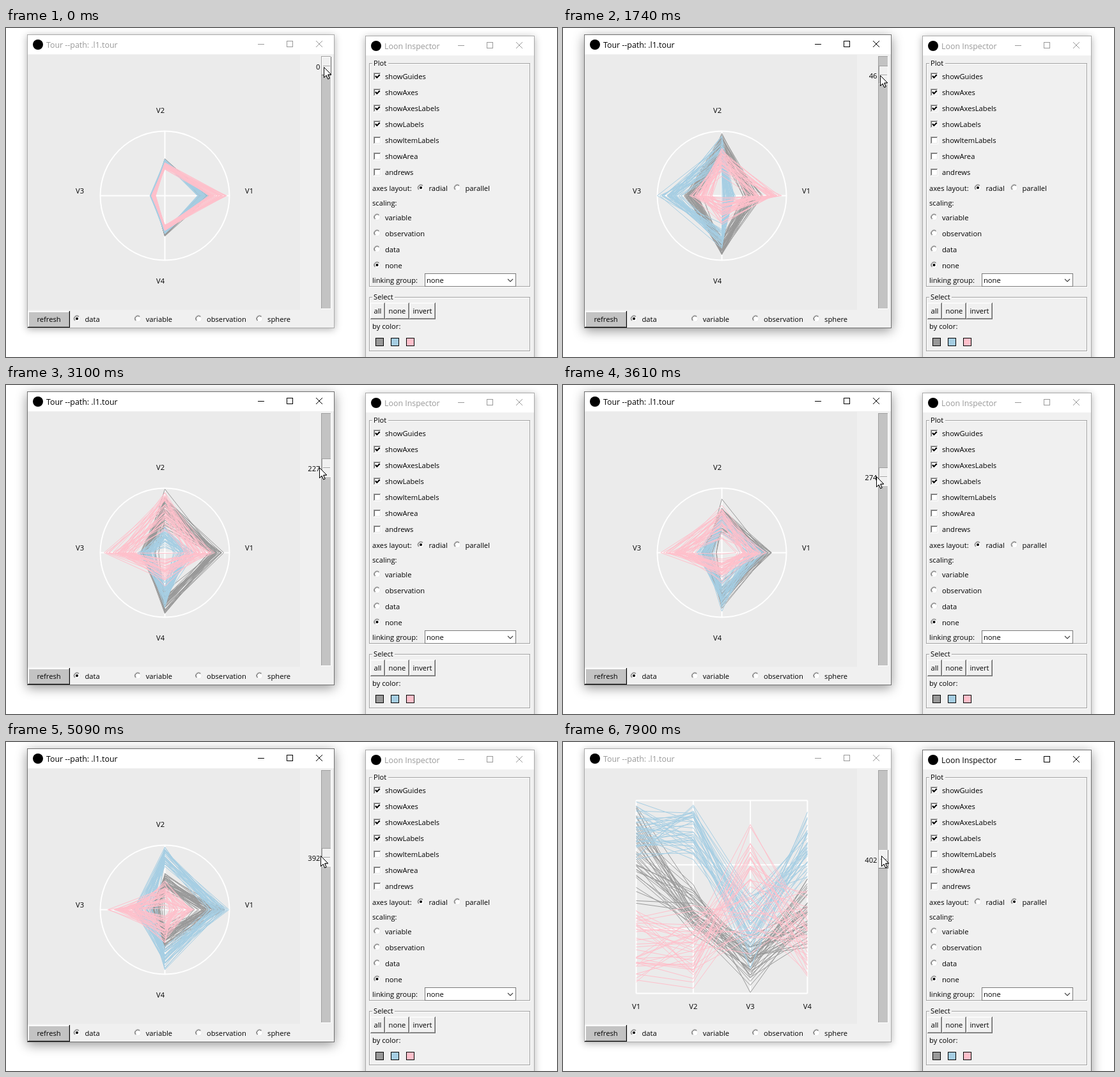
An HTML page with a canvas for the animation above (8000 ms loop, 862 by 515 pixels).

```html
<!DOCTYPE html>
<html lang="en">
<head>
<meta charset="utf-8">
<title>Tour</title>
<style>
  html, body { margin: 0; width: 100%; height: 100%; overflow: hidden; background: #fff; }
  canvas { display: block; }
</style>
</head>
<body>
<canvas id="stage" width="862" height="515"></canvas>
<script>
const ctx = document.getElementById('stage').getContext('2d');
const LOOP = 8000;
const COLORS = ['#999999', '#a6cee3', '#ffc0cb'];
const FACE = '#f0f0f0', TROUGH = '#c3c3c3';
const ITEMS = 38;

// Picture updates come in bursts: [first, last, number of steps]
const BURSTS = [
  [580, 1590, 8], [1740, 2710, 8], [2860, 3100, 3], [3250, 3890, 6],
  [4040, 4160, 2], [4310, 4940, 6], [5090, 5330, 3],
  [5810, 6320, 5], [6440, 6710, 3], [6960, 7900, 7]
];
const ACTIVATE = 580, RELEASE = 5810, SWITCH = 6960, PARALLEL = 7110;

// Tour position over time
const COUNT = [
  [580, 0], [1160, 14], [1740, 46], [2710, 160], [3100, 227],
  [3890, 318], [4160, 330], [4940, 373], [5090, 392], [5330, 402]
];
const DRAG_X = [[580, 497], [1740, 496], [3100, 490], [4160, 490], [5330, 492]];
const MOVE = [
  [5330, 492, 181], [5810, 500, 212], [5940, 538, 292], [6070, 600, 342],
  [6200, 676, 308], [6320, 718, 263], [6440, 714, 257], [6710, 707, 249],
  [7110, 707, 249], [7273, 694, 248], [7430, 640, 236], [7587, 570, 208],
  [7743, 515, 187], [7900, 498, 178]
];

// Spread of each group (grey, blue, pink): tour position, then low/high for V1..V4
const SPREAD = [
  [0,   [.53, .72, .49, .58, .15, .20, .54, .64],
        [.50, .69, .47, .57, .17, .23, .51, .60],
        [.62, 1.0, .40, .52, .13, .21, .45, .55]],
  [46,  [.32, .68, .48, 1.0, .28, .62, .58, 1.0],
        [.00, .22, .38, .95, .58, 1.0, .38, .88],
        [.32, 1.0, .28, .78, .08, .52, .00, .45]],
  [227, [.58, 1.0, .38, 1.0, .08, .46, .58, 1.0],
        [.12, .48, .08, .52, .12, .46, .38, .95],
        [.15, .92, .32, 1.0, .36, 1.0, .00, .52]],
  [330, [.28, .68, .22, .63, .05, .32, .28, .78],
        [.46, 1.0, .56, 1.0, .10, .42, .36, 1.0],
        [.08, .64, .08, .52, .36, 1.0, .04, .42]],
  [402, [.42, 1.0, .28, .60, .00, .36, .18, .66],
        [.66, 1.0, .68, 1.0, .12, .60, .56, 1.0],
        [.00, .52, .00, .50, .20, 1.0, .03, .56]]
];

const lerp = (a, b, k) => a + (b - a) * k;
const clamp = (v, lo, hi) => Math.min(hi, Math.max(lo, v));

// Finds the pair of keys around t and how far t lies between them
function locate(keys, t) {
  let i = 0;
  while (i < keys.length - 2 && t >= keys[i + 1][0]) i++;
  const a = keys[i], b = keys[i + 1];
  return { a, b, k: clamp((t - a[0]) / (b[0] - a[0]), 0, 1) };
}
function sample(keys, t, col = 1) {
  const { a, b, k } = locate(keys, t);
  return lerp(a[col], b[col], k);
}
function snap(t) {
  let last = 0;
  for (const [from, to, steps] of BURSTS) {
    const gap = (to - from) / (steps - 1);
    if (t >= from - .01) last = from + gap * Math.min(steps - 1, Math.floor((t - from + .01) / gap));
  }
  return last;
}

let seed = 20417;
function rand() {
  seed = (seed * 1664525 + 1013904223) % 4294967296;
  return seed / 4294967296;
}
const bell = () => (rand() + rand() - 1) * 1.05;
const traits = COLORS.map(() => Array.from({ length: ITEMS }, () =>
  Array.from({ length: 4 }, () => [bell(), bell()])));

function valuesAt(n) {
  const { a, b, k } = locate(SPREAD, n);
  const turn = n / 130, c = Math.cos(turn), s = Math.sin(turn);
  return traits.map((group, g) => group.map(item => item.map(([p, q], axis) => {
    const lo = lerp(a[g + 1][axis * 2], b[g + 1][axis * 2], k);
    const hi = lerp(a[g + 1][axis * 2 + 1], b[g + 1][axis * 2 + 1], k);
    return lerp(lo, hi, (clamp(p * c + q * s, -1, 1) + 1) / 2);
  })));
}

function rect(x, y, w, h, color) {
  ctx.fillStyle = color;
  ctx.fillRect(x, y, w, h);
}
function frame(x, y, w, h, color) {
  ctx.strokeStyle = color;
  ctx.lineWidth = 1;
  ctx.strokeRect(x + .5, y + .5, w - 1, h - 1);
}
function path(points, color, width = 1, closed = false) {
  ctx.beginPath();
  points.forEach(([x, y]) => ctx.lineTo(x, y));
  if (closed) ctx.closePath();
  ctx.strokeStyle = color;
  ctx.lineWidth = width;
  ctx.stroke();
}
function disc(x, y, r, color) {
  ctx.beginPath();
  ctx.arc(x, y, r, 0, Math.PI * 2);
  ctx.fillStyle = color;
  ctx.fill();
}
// Text placed by the middle of its line
function text(str, x, y, align = 'left', color = '#000', size = 11.2) {
  ctx.font = size + 'px "Open Sans", "Noto Sans", sans-serif';
  ctx.textAlign = align;
  ctx.fillStyle = color;
  ctx.fillText(str, x, y + 4);
}
function bevel(x, y, w, h, light, dark) {
  rect(x, y, w, 1, light);
  rect(x, y, 1, h, light);
  rect(x, y + h - 1, w, 1, dark);
  rect(x + w - 1, y, 1, h, dark);
}

function windowBox(x, y, w, h, title, active) {
  const ink = active ? '#000' : '#999';
  ctx.save();
  ctx.shadowColor = active ? 'rgba(0,0,0,.42)' : 'rgba(0,0,0,.3)';
  ctx.shadowBlur = active ? 17 : 11;
  ctx.shadowOffsetY = active ? 4 : 2;
  rect(x, y, w, h, FACE);
  ctx.restore();
  rect(x, y, w, 31, '#fff');
  frame(x, y, w, h, active ? '#707070' : '#aaaaaa');
  disc(x + 17, y + 16, 8, '#000');
  text(title, x + 30, y + 16.5, 'left', ink, 12.4);
  const right = x + w, mid = y + 16;
  rect(right - 120, mid - 1, 10, 1, ink);
  frame(right - 75, mid - 6, 10, 10, ink);
  path([[right - 29, mid - 6], [right - 19, mid + 4]], ink);
  path([[right - 19, mid - 6], [right - 29, mid + 4]], ink);
}

function radio(x, y, label, on) {
  disc(x, y, 5.5, '#fff');
  for (const [r, from, color] of [[5, .75, '#a0a0a0'], [4.1, .75, '#696969'], [5, -.25, '#e3e3e3']]) {
    ctx.beginPath();
    ctx.arc(x, y, r, Math.PI * from, Math.PI * (from + 1));
    ctx.strokeStyle = color;
    ctx.lineWidth = 1;
    ctx.stroke();
  }
  if (on) disc(x, y, 2.1, '#000');
  text(label, x + 12.5, y + 1);
}
function checkbox(y, label, on) {
  rect(575, y - 6, 12, 12, '#fff');
  bevel(575, y - 6, 12, 12, '#a0a0a0', '#fff');
  bevel(576, y - 5, 10, 10, '#696969', '#e3e3e3');
  if (on) path([[578, y - 1], [580.3, y + 1.7], [584.7, y - 2.8]], '#000', 2.2);
  text(label, 593, y);
}
function button(x, y, w, h, label, face = FACE) {
  rect(x, y, w, h, face);
  bevel(x, y, w, h, '#fff', '#696969');
  bevel(x + 1, y + 1, w - 2, h - 2, '#f4f4f4', '#a0a0a0');
  text(label, x + w / 2, y + h / 2, 'center');
}
function fieldset(y, h, label, labelWidth) {
  frame(569, y + 1, 252, h, '#fff');
  frame(568, y, 252, h, '#a0a0a0');
  rect(573, y - 2, labelWidth, 5, FACE);
  text(label, 575, y);
}

function radialPlot(groups) {
  const cx = 248.5, cy = 262.5, R = 101;
  path([[cx - R, cy], [cx + R, cy]], '#fff', 2);
  path([[cx, cy - R], [cx, cy + R]], '#fff', 2);
  ctx.beginPath();
  ctx.arc(cx, cy, R, 0, Math.PI * 2);
  ctx.stroke();
  groups.forEach((group, g) => group.forEach(([a, b, c, d]) => path(
    [[cx + a * R, cy], [cx, cy - b * R], [cx - c * R, cy], [cx, cy + d * R]], COLORS[g], 1, true)));
  text('V1', 380.5, 255, 'center');
  text('V2', 241.5, 129, 'center');
  text('V3', 115.5, 255, 'center');
  text('V4', 241.5, 396, 'center');
}
function parallelPlot(groups) {
  const top = 91.5, height = 302, axisX = i => 114.5 + i * 89.3;
  for (let i = 0; i < 4; i++) {
    const y = top + height * i / 3;
    path([[axisX(0), y], [axisX(3), y]], '#fff', 2);
    path([[axisX(i), top], [axisX(i), top + height]], '#fff', 2);
    text('V' + (i + 1), axisX(i), 414, 'center');
  }
  groups.forEach((group, g) => group.forEach(item => path(
    item.map((v, i) => [axisX(i), top + height * (1 - v)]), COLORS[g])));
}

function slider(n, pressed) {
  rect(493, 44, 16, 396, TROUGH);
  bevel(493, 44, 16, 396, '#a0a0a0', '#fff');
  const y = Math.round(45 + n * .308);
  const [light, dark] = pressed ? ['#a0a0a0', '#fff'] : ['#fff', '#696969'];
  rect(494, y, 15, 29, FACE);
  bevel(494, y, 15, 29, light, dark);
  rect(496, y + 14, 11, 1, '#a0a0a0');
  rect(496, y + 15, 11, 1, '#fff');
  text(String(n), 491.5, y + 16, 'right');
}

function tourWindow(t, n) {
  windowBox(33, 10, 481, 460, 'Tour --path: .l1.tour', t >= ACTIVATE && t < SWITCH);
  rect(34, 42, 426, 399, '#ebebeb');
  (t >= PARALLEL ? parallelPlot : radialPlot)(valuesAt(n));
  slider(n, t >= ACTIVATE && t < RELEASE);
  button(34, 443, 66, 26, 'refresh', TROUGH);
  rect(99, 443, 1, 26, '#000');
  rect(34, 468, 66, 1, '#000');
  ['data', 'variable', 'observation', 'sphere'].forEach((s, i) => radio(111 + i * 95.2, 455, s, i === 0));
}

function inspector(t) {
  windowBox(562, 12, 265, 540, 'Loon Inspector', t >= SWITCH);
  fieldset(55, 350, 'Plot', 25);
  ['showGuides', 'showAxes', 'showAxesLabels', 'showLabels', 'showItemLabels', 'showArea', 'andrews']
    .forEach((s, i) => checkbox(76 + i * 25, s, i < 4));
  const parallel = t >= PARALLEL;
  text('axes layout:', 573, 251);
  radio(649, 250, 'radial', !parallel);
  radio(706, 250, 'parallel', parallel);
  text('scaling:', 573, 274);
  ['variable', 'observation', 'data', 'none'].forEach((s, i) => radio(580.5, 296 + i * 25, s, i === 3));
  text('linking group:', 573, 395);
  rect(655, 384, 143, 21, '#fff');
  frame(655, 384, 143, 21, '#7a7a7a');
  text('none', 658, 395);
  path([[785, 393], [789, 397], [793, 393]], '#444', 1.2);
  fieldset(421, 85, 'Select', 35);
  button(570, 430, 23, 26, 'all');
  button(593, 430, 38, 26, 'none');
  button(631, 430, 41, 26, 'invert');
  text('by color:', 573, 467);
  COLORS.forEach((c, i) => {
    rect(578 + i * 24, 485, 13, 13, c);
    frame(578 + i * 24, 485, 13, 13, '#000');
  });
}

function cursor(t, n) {
  const dragging = t <= 5330;
  const x = dragging ? sample(DRAG_X, t) : sample(MOVE, t, 1);
  const y = dragging ? 60.5 + n * .3 : sample(MOVE, t, 2);
  ctx.save();
  ctx.translate(Math.round(x) + .5, Math.round(y) + .5);
  path([[0, 0], [0, 16], [3.6, 12.6], [6.2, 18.4], [8.6, 17.3], [6.1, 11.6], [11.2, 11.4]], '#000', 1, true);
  ctx.fillStyle = '#fff';
  ctx.fill();
  ctx.stroke();
  ctx.restore();
}

function draw(now) {
  const t = snap(now % LOOP);
  const n = Math.round(sample(COUNT, t));
  rect(0, 0, 862, 515, '#fff');
  tourWindow(t, n);
  inspector(t);
  cursor(t, n);
}
function tick() {
  draw(performance.now());
  requestAnimationFrame(tick);
}
tick();
</script>
</body>
</html>
```
